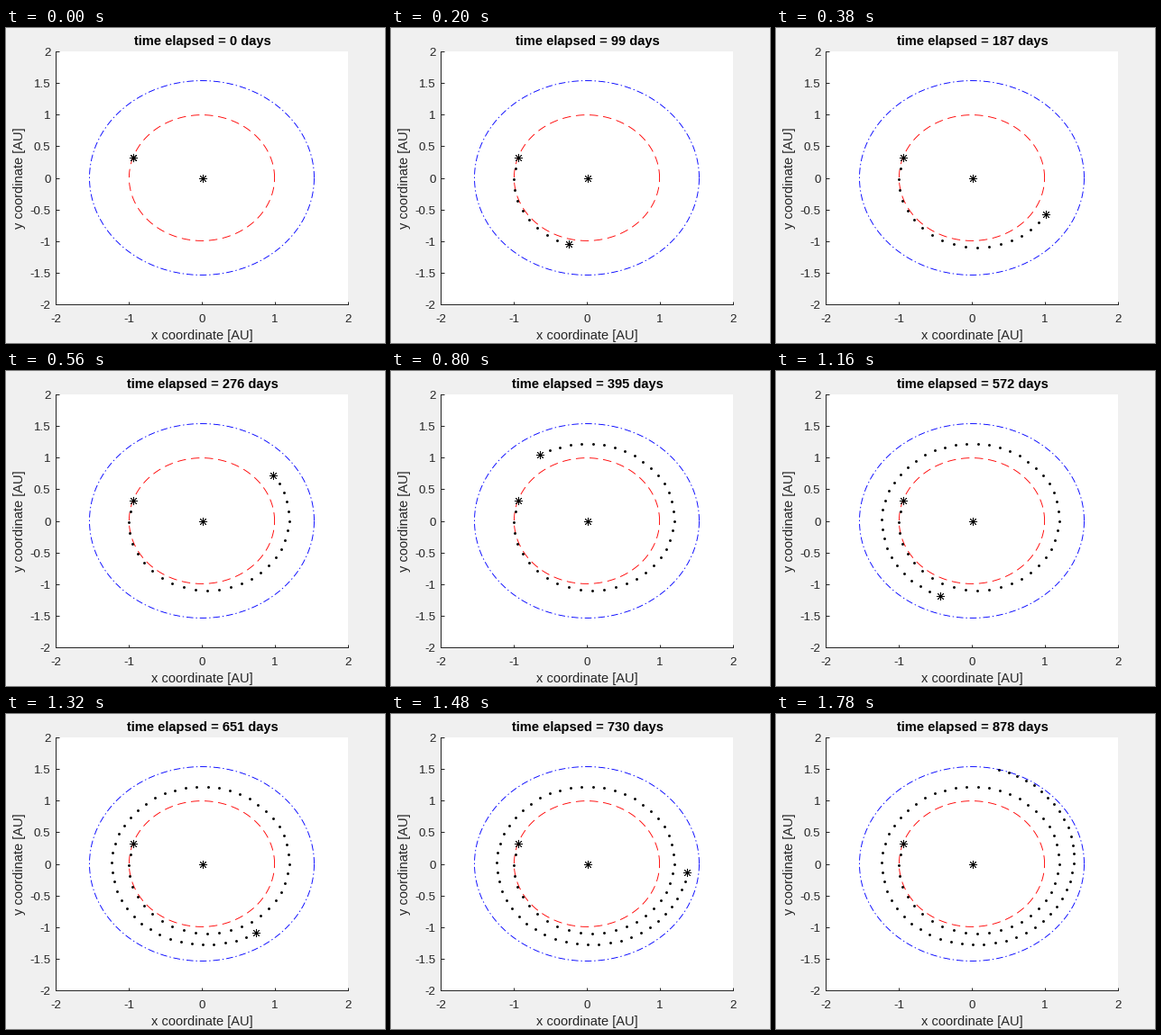
Animation, 420 px wide and 350 px high, one loop 1.8 s. Source, as a matplotlib script:

```python
import numpy as np
import matplotlib.pyplot as plt
from matplotlib.animation import FuncAnimation
from numpy.polynomial import Polynomial

W, H, DPI = 420, 350, 100
PX = 72 / DPI                              # one pixel in points
LEFT, RIGHT, TOP, BOTTOM = 55, 379, 26, 307
MID_X, MID_Y = (LEFT + RIGHT) / 2, (TOP + BOTTOM) / 2
AU_X, AU_Y = (RIGHT - LEFT) / 4, (BOTTOM - TOP) / 4

STEPS, LOOP, DAYS = 90, 1800, 888
EARTH, MARS = 0.995, 1.537                 # orbit radii in AU
START, SWEEP = 160.6, 635.5                # degrees
INK = "#262626"

plt.rcParams["font.family"] = "Liberation Sans"


def spiral():
    """Spacecraft path: a few radii joined smoothly, angle from the area law."""
    keys = [0, 6, 12, 20, 28, 40, 50, 61, 74, 82, 89]
    radii = [0.995, 1.033, 1.091, 1.172, 1.203, 1.238, 1.235, 1.273, 1.375, 1.469, 1.54]
    k = np.arange(STEPS)
    r = Polynomial.fit(keys, radii, 7)(k)
    rate = (1 + 0.00192 * k) / r**2        # thrust slowly adds angular momentum
    swept = np.append(0, np.cumsum((rate[1:] + rate[:-1]) / 2))
    theta = np.radians(START + SWEEP * swept / swept[-1])
    return r * np.cos(theta), r * np.sin(theta)


def snap(x, y):
    """Move points to the nearest pixel centre."""
    col = np.floor(MID_X + AU_X * np.asarray(x)) + 0.5
    row = np.floor(MID_Y - AU_Y * np.asarray(y)) + 0.5
    return np.column_stack([(col - MID_X) / AU_X, (MID_Y - row) / AU_Y])


def label(x, y, text, size, **kw):
    """Text at pixel (x, y), measured from the top left."""
    kw = {"ha": "center", "va": "baseline", "color": INK, **kw}
    return fig.text(x / W, 1 - y / H, text, fontsize=size * PX, **kw)


def orbit(radius, color, dashes):
    t = np.linspace(0, 2 * np.pi, 361)
    ax.plot(radius * np.cos(t), radius * np.sin(t), color=color,
            lw=0.9 * PX, dashes=dashes, dash_capstyle="butt")


def star(point):
    return ax.scatter(*point, marker=(8, 2, 0), s=(8.4 * PX) ** 2,
                      linewidths=0.85 * PX, color="black", zorder=4)


fig = plt.figure(figsize=(W / DPI, H / DPI), dpi=DPI, facecolor="#f0f0f0")
ax = fig.add_axes([LEFT / W, 1 - BOTTOM / H, (RIGHT - LEFT) / W, (BOTTOM - TOP) / H])
ax.set(xlim=(-2, 2), ylim=(-2, 2), facecolor="white")
ax.set_autoscale_on(False)
ax.set_xticks(np.arange(-2, 3), [])
ax.set_yticks(np.arange(-2, 2.5, 0.5), [])
ax.tick_params(direction="in", length=3.5 * PX, width=PX, color=INK)
for side, spine in ax.spines.items():
    spine.set(visible=side in ("left", "bottom"), linewidth=PX, color=INK)

for v in ax.get_xticks():
    label(MID_X + AU_X * v, 327, f"{v:g}", 13.33)
for v in ax.get_yticks():
    label(49.5, MID_Y + 5 - AU_Y * v, f"{v:g}", 13.33, ha="right")
label(MID_X + 0.5, 346, "x coordinate [AU]", 14.67)
label(15.5, MID_Y, "y coordinate [AU]", 14.67, rotation=90, va="center")
title = label(MID_X + 0.5, 19, "", 14.67, weight="bold", color="black")

orbit(EARTH, "red", (10.5, 6.3))
orbit(MARS, "blue", (8.4, 3.2, 1.6, 3.2))

path = snap(*spiral())
star(snap(0, 0)[0])
star(path[0])
craft = star(path[0])
trail = ax.scatter([], [], marker="o", s=(2.9 * PX) ** 2, linewidths=0,
                   color="black", zorder=3)


def update(i):
    arrived = i == STEPS - 1
    trail.set_offsets(path[1:i + arrived])
    craft.set_offsets(path[i])
    craft.set_visible(not arrived)
    title.set_text(f"time elapsed = {round(i * DAYS / STEPS)} days")
    return trail, craft, title


anim = FuncAnimation(fig, update, frames=STEPS, interval=LOOP / STEPS,
                     repeat=True, repeat_delay=0, blit=False)
plt.show()
```
